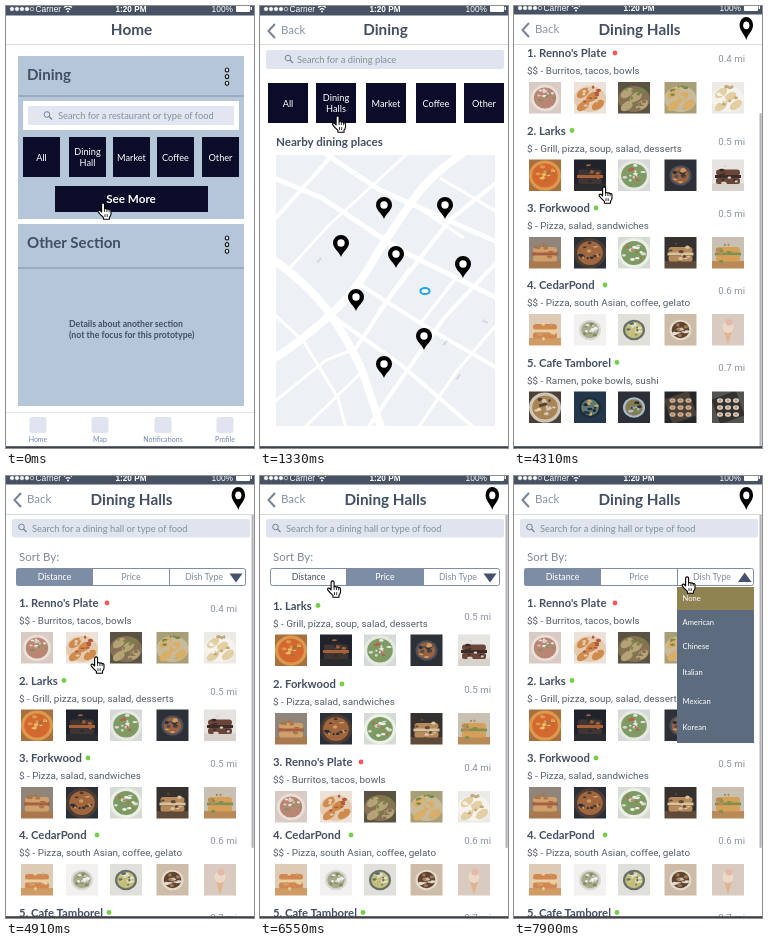
Recreate the animation shown at these times as an HTML page. Size 248x442 px, loop 8000 ms.

```html
<!DOCTYPE html>
<html lang="en">
<head>
<meta charset="utf-8">
<title>Dining prototype</title>
<style>
  html, body { margin: 0; width: 100%; height: 100%; overflow: hidden; background: #fff; }
  #stage { display: block; width: 248px; height: 442px; }
  text { font-family: Lato, "Open Sans", sans-serif; white-space: pre; }
  .roboto { font-family: Roboto, Lato, sans-serif; }
  .sys { font-family: "Liberation Sans", Arial, sans-serif; }
</style>
</head>
<body>
<svg id="stage" viewBox="0 0 248 442" xmlns="http://www.w3.org/2000/svg"></svg>
<script>
const INK = '#434f62', NAVY = '#0b0b2a', SLATE = '#7e8da6', CARD = '#b6c6d9', FIELD = '#e0e4ee';
const HINT = '#858f9f';
const LOOP = 8000;

// ---------- drawing helpers ----------
const rect = (x, y, w, h, fill, more = '') =>
  `<rect x="${x}" y="${y}" width="${w}" height="${h}" fill="${fill}" ${more}/>`;
const text = (s, x, y, size, fill, more = '') =>
  `<text x="${x}" y="${y}" font-size="${size}" fill="${fill}" ${more}>${s}</text>`;
const path = (d, fill, more = '') => `<path d="${d}" fill="${fill}" ${more}/>`;
const line = (d, color, w = 1) => path(d, 'none', `stroke="${color}" stroke-width="${w}"`);
const oval = (x, y, rx, ry, fill, more = '') =>
  `<ellipse cx="${x}" cy="${y}" rx="${rx}" ry="${ry}" fill="${fill}" ${more}/>`;
const group = (id, body, more = '') => `<g id="${id}" ${more}>${body}</g>`;
const MID = 'text-anchor="middle"', END = 'text-anchor="end"', BOLD = 'font-weight="700"';

const lens = (x, y) =>
  oval(x - 1, y - 1, 2.8, 2.8, 'none', 'stroke="#76829a" stroke-width="1"') +
  line(`M${x + 1} ${y + 1}l3 3`, '#76829a', 1.2);

const pin = (x, y, kx = 1, ky = 1) =>
  `<g transform="translate(${x} ${y}) scale(${kx} ${ky})">` +
  path('M0 0C-1.5-5-8-8.5-8-14A8 8 0 0 1 8-14C8-8.5 1.5-5 0 0Z', '#000') +
  oval(0, -14, 3.7, 3.7, '#fff') + '</g>';

const tile = (x, y, w, words) => {
  const rows = words.split('/');
  return rect(x, y, w, 40, NAVY) + rows.map((s, i) =>
    text(s, x + w / 2, y + 23.6 + (i - (rows.length - 1) / 2) * 11, 9.2, '#fff', MID)).join('');
};

const back = y => line(`M15 ${y - 10}l-6.5 7 6.5 7`, '#76849a', 2) + text('Back', 21, y, 11.5, '#8793a6');
const title = (s, y) => text(s, 125.5, y, 15.3, INK, MID + ' ' + BOLD);
const divider = line('M0 38.5H248', '#d5d9e0');

function statusBar() {
  let s = rect(0, -4, 248, 13.5, '#475365');
  for (let i = 0; i < 5; i++)
    s += oval(6 + i * 5, 3, 1.8, 1.8, i < 4 ? '#fff' : 'none', 'stroke="#fff" stroke-width=".6"');
  return s + text('Carrier', 29.5, 6, 8.4, '#fff', 'class="sys"') +
    line('M58 1.5q4-3.4 8 0M59.7 3.6q2.3-2 4.6 0', '#fff', 1.2) + oval(62, 5.4, 1, 1, '#fff') +
    text('1:20 PM', 125, 6, 8.2, '#fff', `class="sys" ${MID} ${BOLD}`) +
    text('100%', 227, 6, 8.4, '#fff', `class="sys" ${END}`) +
    rect(230, -1, 14, 7, '#fff', 'rx="1"') + rect(244.6, 1, 1.4, 3, '#fff');
}

// ---------- home ----------
function home() {
  const dots = y => [0, 6.6, 13.2].map(d =>
    oval(221, y + d, 1.8, 2, '#dfe6ee', 'stroke="#111" stroke-width="1.1"')).join('');
  const card = (name, y, h, rule) => rect(12, y, 226, h, CARD) +
    text(name, 21, y + 23.5, 15.1, INK, BOLD) + dots(y + 14) +
    line(`M12 ${rule}H238`, '#7f90ab', 1.2);
  const tiles = ['All', 'Dining/Hall', 'Market', 'Coffee', 'Other'];
  const tabs = [['Home', 32], ['Map', 94], ['Notifications', 157], ['Profile', 219]];
  return title('Home', 29) + divider +
    card('Dining', 50, 163, 90) +
    rect(17, 95, 216, 29, '#fff') + rect(22, 100, 206, 19, '#e1e6f0') + lens(42, 109.5) +
    text('Search for a restaurant or type of food', 52, 113, 9.3, HINT) +
    tiles.map((s, i) => tile([17, 63, 107, 151, 196][i], 131, 37, s)).join('') +
    rect(49, 180, 153, 26, NAVY) + text('See More', 125, 197, 11.7, '#fff', MID + ' ' + BOLD) +
    card('Other Section', 218, 182, 262) +
    text('Details about another section', 63, 321, 8.7, INK, BOLD) +
    text('(not the focus for this prototype)', 63, 332, 8.7, INK, BOLD) +
    line('M0 406.5H248', '#e3e6ec') +
    tabs.map(([s, x]) => rect(x - 8.5, 411, 17, 16, '#e0e4f0', 'rx="2.5"') +
      text(s, x, 436, 7, '#7387b4', MID)).join('');
}

// ---------- map ----------
function places() {
  const roads = [
    [8, 'M203 147Q172 168 156 190T118 246Q96 288 60 318T14 352'],
    [8, 'M14 254Q52 282 70 308T102 364L122 424'],
    [5, 'M14 172L62 192 140 244 237 292'],
    [5, 'M64 147L120 184 237 236'],
    [4, 'M14 214L50 174 74 147'],
    [4, 'M237 176L190 214 132 288 92 348'],
    [4, 'M237 256L184 312 128 392 108 422'],
    [4, 'M96 276L168 322 237 362'],
    [4, 'M72 310L140 358 214 422'],
    [3, 'M28 264L68 220 112 180 148 147'],
    [3, 'M150 196L204 232M180 172L237 206'],
    [3, 'M14 396L66 354 92 344M44 422L102 366'],
    [3, 'M237 318L196 366 158 422M150 262L118 306'],
    [3, 'M14 308L44 336 78 392 86 422M196 272L160 318']
  ];
  const pins = [[124, 213], [185, 213], [81, 251], [136, 262], [203, 272], [96, 305], [164, 344], [124, 372]];
  const lanes = [[58, 257, -50], [184, 340, -52], [222, 315, 28], [197, 374, -52]];
  const tiles = ['All', 'Dining/Halls', 'Market', 'Coffee', 'Other'];
  return back(28) + title('Dining', 29) + divider +
    rect(6, 44, 238, 19, FIELD, 'rx="2"') + lens(29, 53) +
    text('Search for a dining place', 37, 57, 9.3, HINT) +
    tiles.map((s, i) => tile([8, 56, 106, 156, 204][i], 77, 40, s)).join('') +
    text('Nearby dining places', 16, 140, 11.6, INK, BOLD) +
    `<svg x="16" y="149" width="219" height="271" viewBox="16 149 219 271">` +
    rect(16, 149, 219, 271, '#edf0f5') +
    roads.map(([w, d]) => line(d, '#fff', w)).join('') +
    lanes.map(([x, y, a]) => text('lane', x, y, 3.4, '#a3abb8', `transform="rotate(${a} ${x} ${y})"`)).join('') +
    '</svg>' +
    oval(165, 285, 4.6, 3.1, '#fff', 'stroke="#1ba6ec" stroke-width="2"') +
    pins.map(p => pin(...p)).join('');
}

// ---------- dining halls ----------
// Photo: shape letter, then backdrop, dish, food and garnish colours.
const halls = [
  { name: "Renno's Plate", note: '$$ - Burritos, tacos, bowls', mi: 0.4, y: 131, dist: 136, dot: 101, busy: 1,
    pics: ['r d9cbc4 eae0da b98674 8a8f62', 't ece2d8 e4cbb0 cf8a4c b4593a', 't 5a5242 857254 b5a276 73883f',
           't a89f78 c8bb9c d9ae68 74883f', 't eceae6 f6f3ee e2cfa4 c3a878'] },
  { name: 'Larks', note: '$ - Grill, pizza, soup, salad, desserts', mi: 0.5, y: 208.5, dist: 219, dot: 58, priceShift: -75,
    pics: ['p a8703f dc9a4e d4682f efc068', 's 20232b 2b2c30 3f3633 a8613a', 'p d5d9d8 e6e8e2 7f9a62 b9604a',
           'b 2d3036 4c5058 9a6240 d09a5e', 's e6e4e1 d8d2cc 6a4538 3a2c28'] },
  { name: 'Forkwood', note: '$ - Pizza, salad, sandwiches', mi: 0.5, y: 286, dist: 291, dot: 82, priceShift: -74,
    pics: ['s 8f857a a8794e cfa06a a85f40', 'p 2b3038 4a3b34 a0673f d09a62', 'p d6dcd4 eceee8 7c9a62 b9694c',
           's 34312f 5f4a3a b58a5c dcc29a', 's c9c0b4 b98a58 d59f58 82904c'] },
  { name: 'CedarPond', note: '$$ - Pizza, south Asian, coffee, gelato', mi: 0.6, y: 363, dist: 368, dot: 91,
    pics: ['s ddcbb6 cf9c66 d08850 e9cfa2', 'b f2f1ef d9d8d3 a9aa8c 7f9060', 'b e0dfda 66706a c4bf78 e9e3c0',
           'b cdbda8 e4dace 5f4430 a37a52', 'c d9cbbf e0b48e ecd8c6 e4b8aa'] },
  { name: 'Cafe Tamborel', note: '$$ - Ramen, poke bowls, sushi', mi: 0.7, y: 440.5, dist: 445, dot: 103,
    pics: ['p 4a4038 cfc6b8 a98455 e4d6b0', 'b 24364a 1c2b3a 5d7a72 c9a867', 'b 2b2f38 a9bcc8 8a7a52 6a8a50',
           'g 24262a 4a4038 c9b394 b97a54', 'g 55534f 33322f dcd4c6 b9806a'] }
];

let seed = 7;
const rnd = () => (seed = (seed * 16807) % 2147483647) / 2147483647;
const DISH = { r: 14, p: 16, b: 11 };

function photo(spec, x, y) {
  const [kind, ...hex] = spec.split(' ');
  const [bg, dish, food, garnish] = hex.map(h => '#' + h);
  const bits = (n, r, colors) => Array.from({ length: n }, (_, i) => {
    const a = rnd() * 6.283, d = Math.sqrt(rnd()) * r;
    return oval(16 + d * Math.cos(a), 16 + d * Math.sin(a), 1 + rnd() * 1.8, .8 + rnd(), colors[i % colors.length]);
  }).join('');
  let s = rect(-3, -3, 38, 38, bg);
  const r = DISH[kind];
  if (r) s += oval(16, 16, r, r * .94, dish) + oval(16, 16, r * .8, r * .75, food) + bits(14, r * .65, [garnish, dish, bg]);
  if (kind === 't') {
    s += oval(16, 17, 16, 13, dish);
    for (const [tx, ty] of [[9, 11], [18, 15], [24, 23], [9, 24]])
      s += oval(tx, ty, 7, 4, food, `transform="rotate(-35 ${tx} ${ty})"`);
    s += bits(14, 12, [garnish, dish]);
  }
  if (kind === 's') s += rect(-3, 24, 38, 11, dish) + rect(4, 10, 24, 6, food, 'rx="3"') +
    rect(3, 15.5, 26, 3, garnish) + rect(4, 18.5, 24, 6, food, 'rx="2"') + bits(10, 11, [garnish, dish]);
  if (kind === 'g') {
    s += rect(3, 3, 26, 26, dish, 'transform="rotate(-20 16 16)"');
    for (let i = 0; i < 9; i++) {
      const gx = 8 + i % 3 * 8, gy = 9 + (i / 3 | 0) * 7;
      s += oval(gx, gy, 3, 2.3, food) + oval(gx, gy, 1.4, 1, garnish);
    }
  }
  if (kind === 'c') s += path('M12 17h8l-4 14z', dish) + oval(16, 13, 5.5, 6, food) + oval(17, 8, 3.5, 3.5, garnish);
  return `<svg x="${x}" y="${y}" width="32" height="31.5"><g filter="url(#soft)">${s}</g></svg>`;
}

const hall = (h, i) => group('hall' + i,
  text(`<tspan class="num"></tspan>. ${h.name}`, 13, h.y, 11.3, INK, BOLD) +
  oval(h.dot, h.y - 4, 2.4, 2.4, h.busy ? '#f4595c' : '#74d043') +
  text(h.note, 13, h.y + 17, 9.9, '#565e6a', 'class="roboto"') +
  text(h.mi + ' mi', 231, h.dist, 9.7, '#8a929e', `class="roboto" ${END}`) +
  h.pics.map((p, k) => photo(p, [15, 60, 104, 150.5, 198][k], h.y + 25)).join(''));

const segment = (id, s, x, w, cx) =>
  group(id, rect(x, 92.5, w, 17, '#fff') + text(s, cx, 104, 8.8, SLATE, MID));

function list() {
  const menu = [['None', 125], ['American', 149], ['Chinese', 173], ['Italian', 199], ['Mexican', 228], ['Korean', 254]];
  return `<svg y="39" width="248" height="402" viewBox="0 39 248 402">` + group('scroll',
      rect(6, 43, 238, 18.5, FIELD, 'rx="2"') + lens(16.5, 52) +
      text('Search for a dining hall or type of food', 26, 55.5, 9.3, HINT) +
      text('Sort By:', 13, 85, 11.5, '#7f8998') +
      segment('byDist', 'Distance', 10.5, 76, 48.5) + segment('byPrice', 'Price', 86.5, 77, 125) +
      segment('byDish', 'Dish Type', 163.5, 76, 198) +
      rect(10.5, 92.5, 229, 17, 'none', `rx="2" stroke="${SLATE}"`) +
      line('M86.5 93V109M163.5 93V109', SLATE) +
      path('', '#45526b', 'id="caret"') +
      halls.map(hall).join('') +
      group('menu', rect(163, 111, 77, 156, '#5d6b7e') + rect(163, 111, 77, 23, '#8f8352') +
        menu.map(([s, y]) => text(s, 168.5, y, 7.6, '#fff')).join(''))) +
    rect(245.5, 38, 2.2, 334, '#b3b5b9', 'id="bar" rx="1"') + '</svg>' +
    rect(0, 0, 248, 38, '#fff') + back(27) + title('Dining Halls', 28.5) + pin(232.3, 34, .84, 1.05) + divider;
}

// ---------- pointer ----------
const hand = path('M4.6 10V2.4a1.5 1.5 0 0 1 3 0V7q1.2-1 2.3.2 1.3-.8 2.2.5 1.7-.4 1.9 1.2V12q-.2 2-1.5 3.2V17.2H6.4V15.4Q3.6 13 1.2 9.8.8 8 2.3 8.1 3.6 8.7 4.6 10Z',
    '#fff', 'stroke="#000" stroke-width="1.1" stroke-linejoin="round"') +
  line('M7.6 7V10M9.9 7.3V10M12.1 7.8V10.2M8 12.2V15M10.2 12.2V15', '#000', .8);
const arrow = path('M.8.8V14.4L3.9 11.6 6.3 17 8.8 16 6.4 10.7H10.7Z', '#000', 'stroke="#fff" stroke-width=".9"');

// ---------- timeline ----------
const screens = [[0, 'home'], [590, 'places'], [2980, 'list']];
const scrolls = [[0, 0], [4310, 80], [4910, 0]];
const sorts = [[0, 'dist'], [6110, 'price'], [7150, 'dist']];
const menus = [[0, false], [7900, true]];
const moves = [
  [0, 'hand', 91, 196], [890, 'arrow', 94, 177], [1040, 'arrow', 62, 132], [1180, 'hand', 69, 113],
  [1330, 'hand', 71.5, 109], [2980, 'arrow', 75, 106.5], [3570, 'arrow', 83, 157], [3720, 'hand', 84, 179],
  [3870, 'hand', 84, 180], [5210, 'arrow', 95, 141], [5360, 'hand', 104, 102], [5660, 'hand', 104, 103],
  [5810, 'hand', 103, 104], [6250, 'hand', 102.5, 103], [6400, 'hand', 68, 103], [6550, 'hand', 66.5, 104],
  [7150, 'hand', 73, 103], [7300, 'hand', 152, 102], [7450, 'hand', 165, 102], [7600, 'hand', 167, 101.5],
  [7900, 'hand', 167, 100]
];
const at = (steps, t) => steps.findLast(s => s[0] <= t);

const stage = document.getElementById('stage');
stage.innerHTML = '<filter id="soft"><feGaussianBlur stdDeviation=".7"/></filter>' +
  rect(0, 0, 248, 442, '#fff') +
  group('home', home()) + group('places', places()) + group('list', list()) +
  group('status', statusBar()) + rect(0, 440.2, 248, 1.8, '#3c414a') +
  group('pointer', group('hand', hand) + group('arrow', arrow));

const $ = id => document.getElementById(id);
const show = (id, on) => $(id).setAttribute('display', on ? 'inline' : 'none');
const move = (id, x, y) => $(id).setAttribute('transform', `translate(${x} ${y})`);

function paintSegment(id, on, off) {
  $(id).firstChild.setAttribute('fill', on ? SLATE : '#fff');
  $(id).lastChild.setAttribute('fill', on ? '#fff' : off);
}

function draw(t) {
  const screen = at(screens, t)[1];
  for (const [, id] of screens) show(id, id === screen);
  move('status', 0, screen === 'list' ? -1 : 0);

  const top = at(scrolls, t)[1];
  move('scroll', 0, -top);
  $('bar').setAttribute('y', top ? 107 : 38);

  const price = at(sorts, t)[1] === 'price';
  paintSegment('byDist', !price, INK);
  paintSegment('byPrice', price, SLATE);
  halls.forEach((h, i) => {
    move('hall' + i, 0, price ? (i ? h.priceShift || 0 : 159) : 0);
    const rank = price && i < 3 ? (i + 2) % 3 : i;
    $('hall' + i).querySelector('.num').textContent = rank + 1;
  });

  const open = at(menus, t)[1];
  show('menu', open);
  $('caret').setAttribute('d', open ? 'M224 106H237.5L230.7 96.5Z' : 'M223.5 97.5H236.5L230 106.5Z');

  const [, kind, x, y] = at(moves, t);
  show('hand', kind === 'hand');
  show('arrow', kind === 'arrow');
  move('pointer', x, y);
}

const start = performance.now();
function tick() {
  draw((performance.now() - start) % LOOP);
  requestAnimationFrame(tick);
}
draw(0);
requestAnimationFrame(tick);
</script>
</body>
</html>
```
